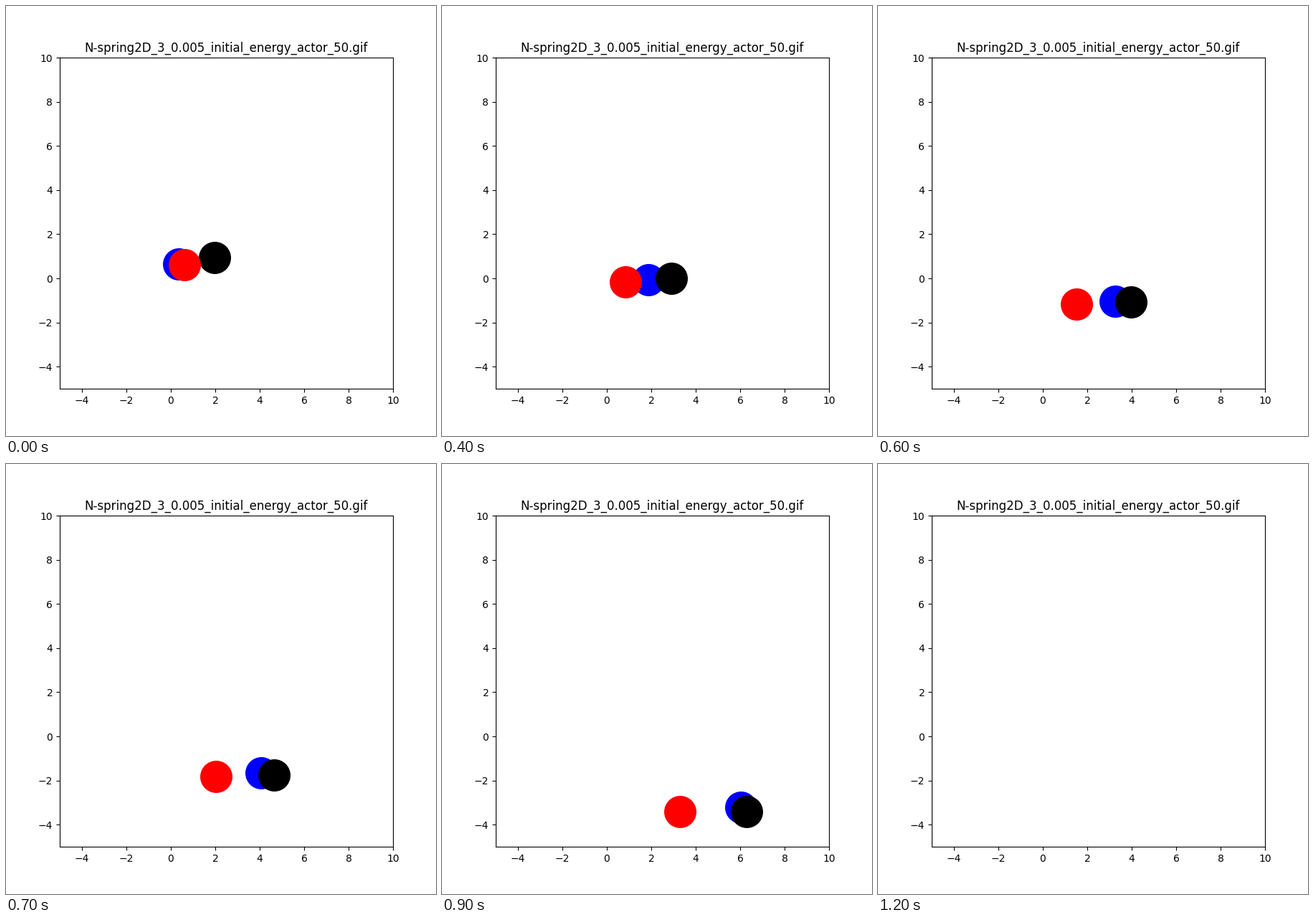
These frames come from a looping animation (600 px wide and 600 px high, 2.6 s). A matplotlib script:

```python
import numpy as np
import matplotlib.pyplot as plt
from matplotlib.animation import FuncAnimation

FRAMES, INTERVAL = 26, 100
PULL = np.array([0.2, -0.2])  # constant acceleration term, per step squared

# colour, place at step 0, drift place at step 1, drift per step afterwards
BALLS = [
    ("blue", (0.368, 0.640), (0.726, 0.668), (0.361, 0.0525)),
    ("black", (1.975, 0.937), (2.037, 0.870), (0.0615, -0.0690)),
    ("red", (0.629, 0.617), (0.376, 0.621), (-0.3235, 0.0055)),
]


def position(step, start, after, drift):
    start, after, drift = map(np.array, (start, after, drift))
    if step < 1:
        base = start + (after - start) * step
    else:
        base = after + drift * (step - 1)
    return base + PULL * step ** 2


fig, ax = plt.subplots(figsize=(6, 6), dpi=100)
ax.set(xlim=(-5, 10), ylim=(-5, 10))
ax.set_title("N-spring2D_3_0.005_initial_energy_actor_50.gif")

dots = [
    ax.plot([], [], "o", color=ball[0], markersize=32.4, markeredgewidth=0)[0]
    for ball in BALLS
]


def update(i):
    for dot, (_, *path) in zip(dots, BALLS):
        x, y = position(i / 2, *path)
        dot.set_data([x], [y])
    return dots


anim = FuncAnimation(fig, update, frames=FRAMES, interval=INTERVAL,
                     repeat=True, repeat_delay=0)
plt.show()
```
